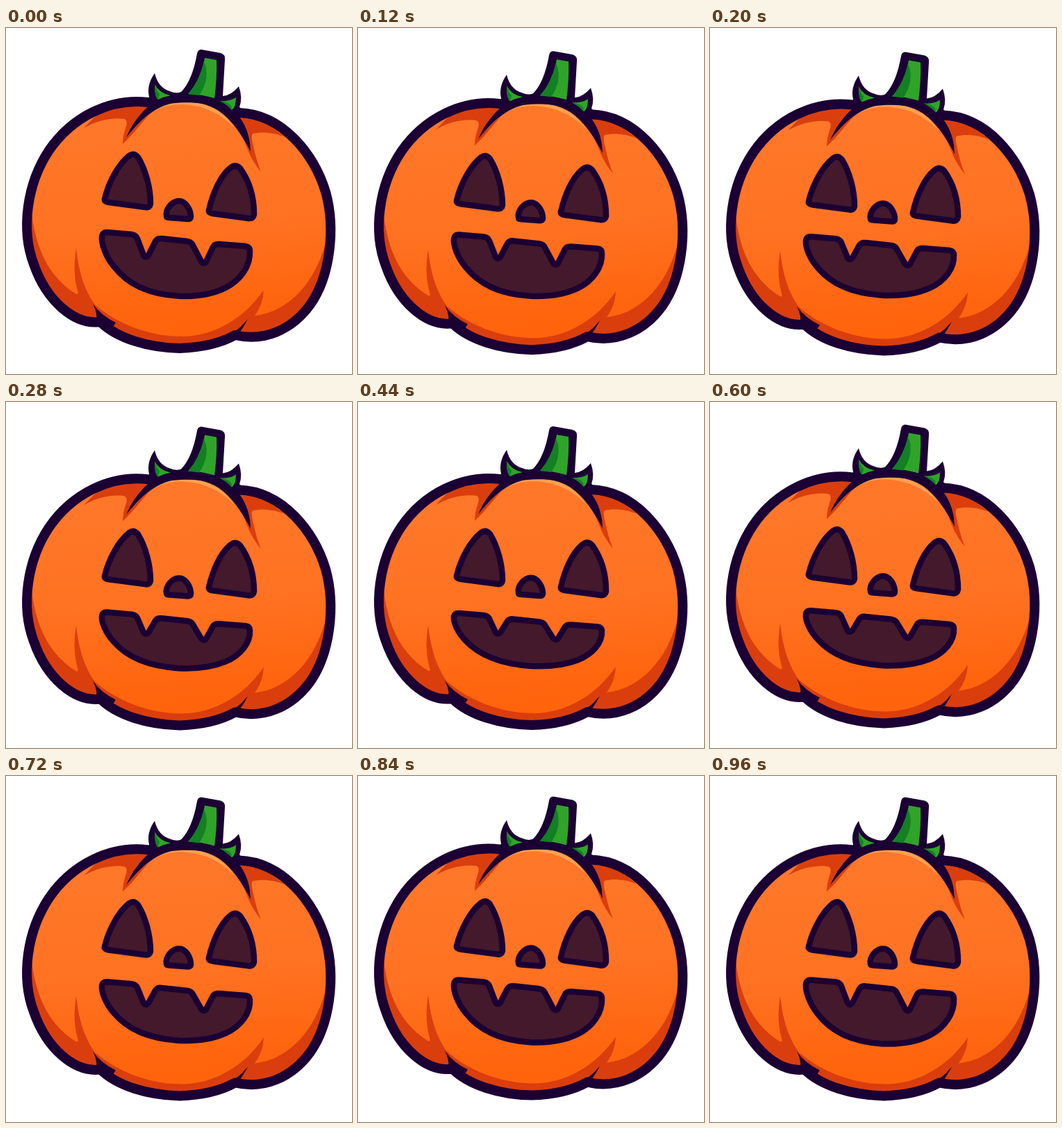
Write an HTML page with a canvas that moves like this. It is 498 by 498 pixels and loops after 1000 ms.

```html
<!DOCTYPE html>
<html lang="en">
<head>
<meta charset="utf-8">
<title>Pumpkin</title>
<style>
html, body { margin: 0; width: 100%; height: 100%; overflow: hidden; background: #fff; }
canvas { display: block; width: 100vw; height: 100vh; }
</style>
</head>
<body>
<canvas id="stage" width="498" height="498"></canvas>
<script>
const ctx = document.getElementById('stage').getContext('2d');
const LOOP = 1000, STEP = 40;
const INK = '#1b0033', SHADE = '#da3e0d', GLOW = '#ffa052', HOLE = '#43192b';
const GREEN = '#2fa429', MOSS = '#128023';

const skin = ctx.createLinearGradient(235, 110, 265, 455);
skin.addColorStop(0, '#ff782a');
skin.addColorStop(0.5, '#ff7222');
skin.addColorStop(0.85, '#ff650e');
skin.addColorStop(1, '#ff640c');

const p = d => new Path2D(d);

const body = p(`M205 107 C150 100 95 128 62 176 C30 224 21 290 40 340
  C58 392 98 428 136 423 C160 447 205 460 250 461 C285 460 312 452 330 442
  C372 452 412 434 438 398 C466 358 475 290 460 236 C444 184 400 124 335 122
  C318 106 290 101 262 100 C238 100 220 104 205 107Z`);

const shades = [
  // upper folds
  'M112 144 C130 133 155 128 171 131 Q176 134 172 144 Q168 156 168 167 L180 155 L214 115 L200 100 L150 105Z',
  'M402 157 C385 150 368 149 355 152 Q352 155 356 170 Q360 190 367 207 Q356 194 349 178 L328 125 L350 118Z',
  // lower lobes
  'M34 225 C36 300 52 352 101 383 Q105 384 103 378 C97 357 98 336 101 317 C105 355 115 382 131 402 L142 430 L90 428 L22 330Z',
  'M128 398 C160 426 205 444 255 444 C300 443 343 418 371 377 Q370 398 358 414 C403 410 452 368 465 285 L475 350 L420 450 L250 470 L140 432Z'
].map(p);

const glow = p('M197 130 C215 110 238 104 262 105 C292 107 316 123 329 144 C310 124 287 112 256 110 C232 109 214 117 197 130Z');
const brow = p(`M173 158 C184 129 209 106 225 99 C240 93 287 91 310 104
  C337 121 352 147 352 178 C338 152 326 133 306 119 C290 109 272 106 255 106
  C216 108 193 133 173 158Z`);
const notches = [
  'M125 397 Q137 414 158 424 L150 436 L128 428 Q134 415 125 397Z',
  'M348 419 Q340 434 336 438 L326 449 L305 451 Q331 440 348 419Z'
].map(p);

const stemInk = p(`M281 31 L309 36 Q316 38 315 46 L312 98 Q324 97 335 84
  Q341 100 336 114 Q331 121 322 121 L295 108 L215 105 Q206 104 206 99
  Q202 82 214 65 Q219 86 236 91 Q245 95 252 92 Q268 76 275 37 Q276 31 281 31Z`);
const stem = p('M286 43 L303 46 Q304 72 300 101 Q280 95 262 95 Q280 76 286 43Z');
const stemShade = p('M285 48 Q295 72 278 97 L262 95 Q278 77 285 48Z');
const leaves = [
  ['M214 81 Q221 94 237 97 Q227 99 219 103 Q214 100 214 81Z', 'M214 81 Q217 91 221 95 L219 103 Q214 100 214 81Z'],
  ['M331 100 Q331 114 325 118 Q318 110 308 105 Q322 106 331 100Z', 'M308 105 Q319 106 324 112 L325 118 Q318 110 308 105Z']
].map(pair => pair.map(p));

const eyes = [
  'M142 246 C148 221 162 196 177 184 Q184 179 190 186 C201 204 208 230 208 253 Q207 259 201 258 L148 251 Q141 250 142 246Z',
  'M292 262 C298 236 309 213 322 202 Q330 195 337 202 C350 220 357 244 357 268 Q356 275 349 274 L297 267 Q291 266 292 262Z'
].map(p);
const nose = p('M231 271 C229 261 239 249 249 249 C259 249 266 262 266 272 Q266 275 262 275 L235 273 Q231 273 231 271Z');
const mouth = p(`M145 294 L181 297 Q187 298 189 303 L198 327 Q201 332 205 327
  L215 307 Q218 302 224 303 L261 307 Q266 308 268 311 L281 336 Q285 341 288 336
  L298 315 Q300 311 306 311 L345 314 Q351 315 351 321 C352 342 338 363 316 374
  C296 384 272 387 248 386 C204 383 175 369 155 343 C143 328 137 310 138 300 Q139 294 145 294Z`);

function fill(path, color) {
  ctx.fillStyle = color;
  ctx.fill(path);
}

function outline(path, width) {
  ctx.lineWidth = width;
  ctx.strokeStyle = INK;
  ctx.stroke(path);
}

function hole(path) {
  fill(path, HOLE);
  outline(path, 8.5);
}

function drawStem() {
  fill(stemInk, INK);
  fill(stem, GREEN);
  fill(stemShade, MOSS);
  for (const [leaf, dark] of leaves) {
    fill(leaf, GREEN);
    fill(dark, MOSS);
  }
}

function drawBody() {
  fill(body, skin);
  ctx.save();
  ctx.clip(body);
  shades.forEach(s => fill(s, SHADE));
  ctx.restore();
  // the middle lobe covers the folds beside it
  fill(brow, skin);
  fill(glow, GLOW);
  outline(body, 14);
  fill(brow, INK);
  notches.forEach(n => fill(n, INK));
}

// Squash the mouth along its own tilt, keeping the line weight.
function drawMouth(squash) {
  const m = new DOMMatrix([1, 0.09 * squash, 0, 1 - squash, 0, 311.4 * squash]);
  const shape = new Path2D();
  shape.addPath(mouth, m);
  hole(shape);
}

function draw(time) {
  const t = Math.floor((time % LOOP) / STEP) * STEP / LOOP;
  const bob = 1.6 + 3 * Math.sin(2 * Math.PI * (t - 0.09));
  const squash = 0.0965 * (1 - Math.cos(2 * Math.PI * (t + 0.04)));

  ctx.setTransform(1, 0, 0, 1, 0, 0);
  ctx.fillStyle = '#fff';
  ctx.fillRect(0, 0, 498, 498);
  ctx.translate(0, bob);
  ctx.lineJoin = 'round';
  drawBody();
  drawStem();
  eyes.forEach(hole);
  hole(nose);
  drawMouth(squash);
}

const start = performance.now();
function tick() {
  draw(performance.now() - start);
  requestAnimationFrame(tick);
}
tick();
</script>
</body>
</html>
```
